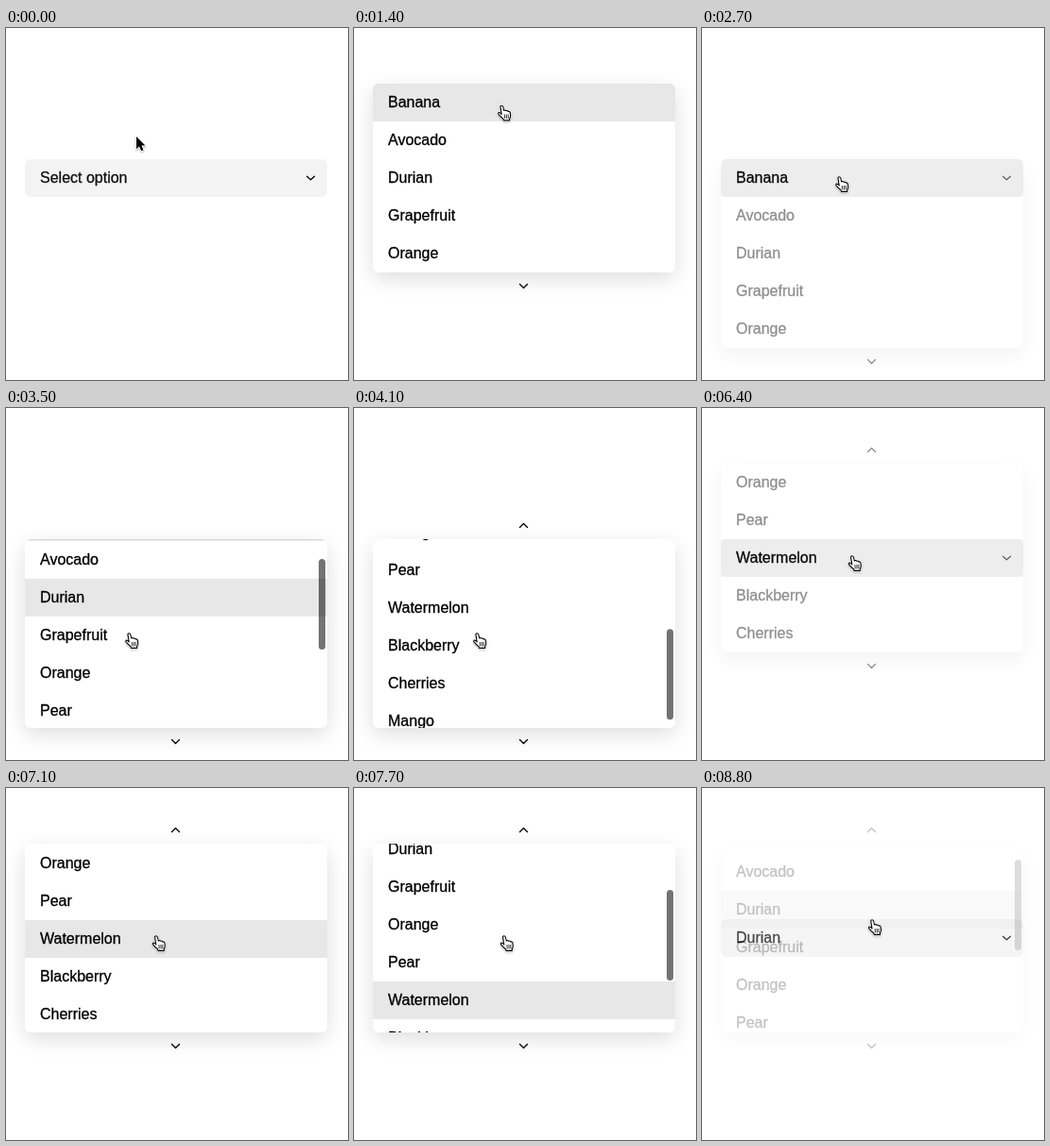
Animation, 362 px wide and 373 px high, one loop 8.9 s. Source, as an HTML page with a canvas:

```html
<!DOCTYPE html>
<html lang="en">
<head>
<meta charset="utf-8">
<title>Select menu</title>
<style>
html, body { margin: 0; width: 362px; height: 373px; overflow: hidden; background: #fff; }
canvas { display: block; }
</style>
</head>
<body>
<canvas id="stage" width="362" height="373"></canvas>
<script>
const LOOP = 8900, STEP = 100;
const LEFT = 20, WIDTH = 320, ROW = 40, VIEW = 200, RADIUS = 6;
const BUTTON_TOP = 139, HIGH_TOP = BUTTON_TOP - 2 * ROW;
const fruits = ['Banana', 'Avocado', 'Durian', 'Grapefruit', 'Orange',
  'Pear', 'Watermelon', 'Blackberry', 'Cherries', 'Mango'];
const MAX_SCROLL = fruits.length * ROW - VIEW;

const stage = document.getElementById('stage').getContext('2d');
const layerCanvas = document.createElement('canvas');
layerCanvas.width = 362;
layerCanvas.height = 373;
const layer = layerCanvas.getContext('2d');

const clamp = v => Math.min(1, Math.max(0, v));
const smooth = u => u * u * (3 - 2 * u);
const easeOut = u => 1 - (1 - u) ** 1.8;
const progress = (t, from, to) => clamp((t - from) / (to - from));

const home = { x: 138, y: 115 };
const moves = [
  { from: 0, to: 300, x: 141, y: 159 },
  { from: 700, to: 1400, x: 152, y: 81.5 },
  { from: 1900, to: 2400, x: 141, y: 157 },
  { from: 2800, to: 3200, x: 126, y: 238 },
  { from: 4200, to: 4700, x: 43, y: 194 },
  { from: 4700, to: 5100, x: 143, y: 203 },
  { from: 5300, to: 5800, x: 175, y: 131 },
  { from: 5900, to: 6100, x: 154.6, y: 156 },
  { from: 8300, to: 8500, x: 175.8, y: 139 },
];

// Each session is one opening of the menu; spins are turns of the wheel.
const sessions = [
  { open: 600, close: 1800, top: HIGH_TOP, scroll: 0, active: -1, pick: 'Banana', spins: [] },
  { open: 2700, close: 5300, top: BUTTON_TOP, scroll: 0, active: 0, pick: 'Watermelon',
    spins: [{ from: 3400, to: 4300, end: MAX_SCROLL, ease: easeOut }] },
  { open: 6400, close: 8700, top: HIGH_TOP, scroll: 160, active: 6, pick: 'Durian',
    spins: [{ from: 7050, to: 7700, end: 94, ease: smooth },
      { from: 7900, to: 8200, end: 30, ease: smooth }] },
];

function cursorAt(t) {
  return moves.reduce((p, m) => {
    const u = smooth(progress(t, m.from, m.to));
    return { x: p.x + (m.x - p.x) * u, y: p.y + (m.y - p.y) * u };
  }, home);
}

const scrollAt = (s, t) => s.spins.reduce(
  (v, spin) => v + (spin.end - v) * spin.ease(progress(t, spin.from, spin.to)), s.scroll);

function alphaAt(s, t) {
  return t >= s.close
    ? clamp(0.57 - (t - s.close) / 300)
    : 1 - (1 - clamp((t - s.open + 100) / 400)) ** 2;
}

// The highlight only follows the pointer while the pointer moves.
function activeRow(s, t) {
  t = Math.min(t, s.close);
  const move = moves.filter(m => m.from < t).pop();
  const moved = Math.min(t, move.to);
  if (moved <= s.open) return s.active;
  return Math.floor((cursorAt(moved).y - s.top + scrollAt(s, moved)) / ROW);
}

function barAlpha(s, t) {
  if (!s.spins.length) return 0;
  const last = s.spins[s.spins.length - 1];
  return progress(t, s.spins[0].from + 50, s.spins[0].from + 100) *
    (1 - progress(t, last.to + 400, last.to + 700) * (s.close - last.to > 700));
}

function roundRect(c, x, y, w, h, r) {
  c.beginPath();
  c.roundRect(x, y, w, h, r);
}

function label(c, text, middle, color) {
  c.font = '16px "Liberation Sans", Arial, sans-serif';
  c.fillStyle = c.strokeStyle = color;
  c.lineWidth = 0.3;
  c.lineJoin = 'round';
  c.fillText(text, LEFT + 16, middle + 5);
  c.strokeText(text, LEFT + 16, middle + 5);
}

function chevron(c, x, y, depth) {
  c.beginPath();
  c.moveTo(x - 4, y - depth / 2);
  c.lineTo(x, y + depth / 2);
  c.lineTo(x + 4, y - depth / 2);
  c.strokeStyle = '#000';
  c.lineWidth = 1.3;
  c.lineCap = c.lineJoin = 'round';
  c.stroke();
}

function drawButton(t) {
  const done = sessions.filter(s => s.close <= t).pop();
  stage.fillStyle = '#f3f3f3';
  roundRect(stage, LEFT, BUTTON_TOP, WIDTH, ROW, RADIUS);
  stage.fill();
  label(stage, done ? done.pick : 'Select option', BUTTON_TOP + 20, '#111');
  chevron(stage, 322.5, 159, 3.6);
}

function drawPopup(s, t, alpha) {
  const c = layer, top = s.top;
  const scroll = scrollAt(s, t);
  const active = activeRow(s, t);
  const scrolled = s.scroll > 0 || t > s.spins[0]?.from + STEP;
  c.clearRect(0, 0, 362, 373);

  c.save();
  c.shadowColor = 'rgba(0,0,0,0.13)';
  c.shadowBlur = 22;
  c.shadowOffsetY = 7;
  c.fillStyle = '#fff';
  roundRect(c, LEFT, top, WIDTH, VIEW, RADIUS);
  c.fill();
  c.restore();

  c.save();
  roundRect(c, LEFT, top, WIDTH, VIEW, RADIUS);
  c.clip();
  if (!scrolled) {
    c.fillStyle = '#d8d8d8';
    c.fillRect(LEFT, top, WIDTH, 1.5);
  }
  fruits.forEach((fruit, i) => {
    const y = top + i * ROW - scroll;
    if (i === active) {
      c.fillStyle = '#e7e7e7';
      c.fillRect(LEFT, y, WIDTH, ROW);
    }
    label(c, fruit, y + 20, '#000');
  });
  c.globalAlpha = barAlpha(s, t);
  c.fillStyle = 'rgba(0,0,0,0.55)';
  roundRect(c, 331, top + 2 + scroll / 2, 7, 96, 3.5);
  c.fill();
  c.restore();

  if (scrolled) chevron(c, 179.5, top - 14.5, -4);
  if (scroll < MAX_SCROLL - 0.5) chevron(c, 179.5, top + VIEW + 14.5, 4);

  stage.globalAlpha = alpha;
  stage.drawImage(layerCanvas, 0, 0);
  stage.globalAlpha = 1;
}

const arrow = new Path2D('M0 0 V13.2 L3 10.4 L5.2 15.2 L7.5 14.2 L5.4 9.6 H9.4 Z');
const hand = new Path2D('M4.2 10 L3 2.4 Q2.8 .7 4.2 .7 Q5.5 .7 5.8 2 L6.7 6 Q7.8 4.9 9 6.2 ' +
  'Q10.3 5.5 11.2 6.9 Q12.9 6.6 13.3 8.2 L13.7 11 Q13.7 13 12.7 14.5 L12.6 16.4 H6.4 L6 14.8 ' +
  'Q3.5 12.8 1 9.8 Q.3 8.3 1.6 8 Q2.8 8 4.2 10 Z');
const creases = new Path2D('M7.3 10.4 L7.6 14 M9.3 10.3 L9.5 14 M11.2 10.2 L11.3 14');

function drawCursor(t, popupOpen) {
  const { x, y } = cursorAt(t);
  const pointing = popupOpen || y >= BUTTON_TOP;
  const shape = pointing ? hand : arrow;
  const c = stage;
  c.save();
  c.translate(x, y);
  c.lineJoin = 'round';
  c.save();
  c.shadowColor = 'rgba(0,0,0,0.3)';
  c.shadowBlur = 2;
  c.shadowOffsetY = 1;
  c.strokeStyle = '#fff';
  c.lineWidth = 2;
  c.stroke(shape);
  c.restore();
  c.fillStyle = pointing ? '#fff' : '#000';
  c.fill(shape);
  if (pointing) {
    c.strokeStyle = '#000';
    c.lineWidth = 1.1;
    c.stroke(shape);
    c.lineWidth = 0.8;
    c.stroke(creases);
  }
  c.restore();
}

function draw(now) {
  const t = Math.floor((now % LOOP) / STEP) * STEP;
  const session = sessions.filter(s => s.open <= t).pop();
  const alpha = session ? alphaAt(session, t) : 0;
  stage.fillStyle = '#fff';
  stage.fillRect(0, 0, 362, 373);
  drawButton(t);
  if (alpha > 0) drawPopup(session, t, alpha);
  drawCursor(t, alpha > 0);
}

let start;
function tick(now) {
  start ??= now;
  draw(Math.max(0, now - start));
  requestAnimationFrame(tick);
}
draw(0);
requestAnimationFrame(tick);
</script>
</body>
</html>
```
